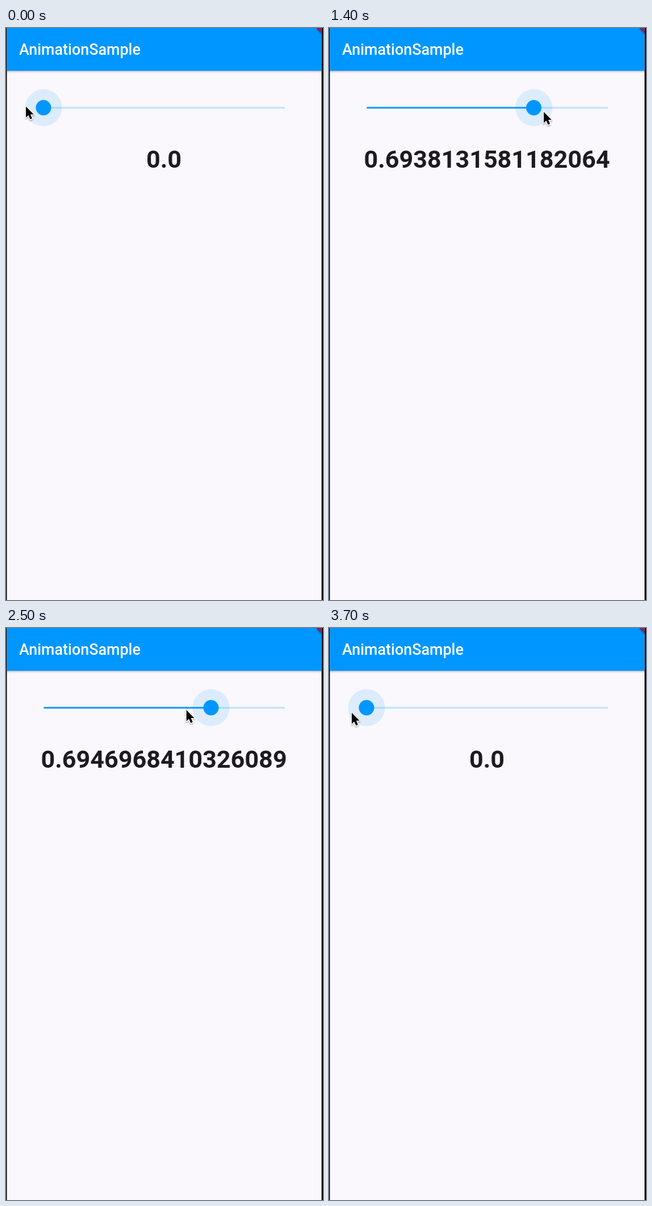
Recreate the animation shown at these times as an HTML page. Size 558 px wide and 1003 px high, loop 3900 ms.

```html
<!DOCTYPE html>
<html lang="en">
<head>
<meta charset="utf-8">
<title>Slider</title>
<style>
  html, body { margin: 0; width: 100%; height: 100%; overflow: hidden; background: #000; }
  svg { display: block; width: 558px; height: 1003px; font-family: Roboto, sans-serif; }
</style>
</head>
<body>
<svg viewBox="0 0 558 1003">
  <defs>
    <linearGradient id="shade" x2="0" y2="1">
      <stop stop-color="#000" stop-opacity=".3"/>
      <stop offset="1" stop-color="#000" stop-opacity="0"/>
    </linearGradient>
    <filter id="soft" x="-50%" y="-50%" width="200%" height="200%">
      <feDropShadow dx="0" dy="1.5" stdDeviation="1.3" flood-opacity=".4"/>
    </filter>
    <clipPath id="screen"><path d="M1.5 0H555.5V1003H1.5Z"/></clipPath>
  </defs>
  <g clip-path="url(#screen)">
    <path d="M0 0H558V1003H0Z" fill="#faf8fc"/>
    <path d="M0 74H558V79H0Z" fill="url(#shade)"/>
    <path d="M0 0H558V75H0Z" fill="#0096ff"/>
    <path d="M546 0H558V12Z" fill="#8c2350" filter="url(#soft)"/>
    <text x="23" y="47" font-size="26.9" font-weight="500" fill="#fff">AnimationSample</text>
  </g>
  <g transform="translate(66 139.8)">
    <g stroke-width="2.7" stroke-linecap="round">
      <path d="M1.5 0H424" stroke="#bce0fd"/>
      <path id="active" stroke="#0096ff"/>
    </g>
    <g id="thumb" fill="#0096ff">
      <circle r="32.5" fill-opacity=".12"/>
      <circle r="13.5"/>
    </g>
  </g>
  <text id="label" x="278" y="244.6" font-size="43.1" font-weight="700" text-anchor="middle" fill="#1d1b20"></text>
  <path id="cursor" d="M0 0V19.6L4.4 15.5L7.5 22.6L11 21.1L8 14.1H13.8Z" stroke="#fff" stroke-width="2.8"
    stroke-linejoin="round" paint-order="stroke" filter="url(#soft)"/>
</svg>
<script>
const $ = id => document.getElementById(id);
const LOOP = 3900, STEP = 100, WIDTH = 424.5, BRAKE = 2800;

// Key poses of the drag: time, slider value, pointer x, pointer y
const poses = [
  [0, 0, 35, 137.5],
  [100, 0, 72, 140],
  [250, 0, 72, 140],
  [700, .27079971976902123, 212.5, 155.5],
  [1400, .6938131581182064, 378, 147],
  [2000, 1, 529, 144],
  [2150, 1, 529, 144],
  [2300, .9863440472146743, 443, 144],
  [BRAKE, .25722603175951103, 129.5, 143.5],
  [3300, .012660814368206753, 57, 146.5],
  [3700, 0, 40, 148.5]
];

// Steady drag between poses, slowing into each one after BRAKE
function poseAt(t) {
  const k = poses.findIndex(pose => pose[0] > t);
  if (k < 0) return poses.at(-1);
  const a = poses[k - 1], b = poses[k];
  const p = (t - a[0]) / (b[0] - a[0]);
  const e = t < BRAKE ? p : 1 - (1 - p) ** 3;
  return a.map((from, i) => from + (b[i] - from) * e);
}

function draw(now) {
  const [, value, x, y] = poseAt(Math.floor(now % LOOP / STEP) * STEP);
  const thumb = WIDTH * value;
  $("label").textContent = Number.isInteger(value) ? value.toFixed(1) : value;
  $("thumb").setAttribute("transform", `translate(${thumb})`);
  $("active").setAttribute("d", `M1.5 0H${Math.max(1.5, thumb)}`);
  $("cursor").setAttribute("transform", `translate(${x} ${y})`);
}

const start = performance.now();
function tick() {
  draw(performance.now() - start);
  requestAnimationFrame(tick);
}
tick();
</script>
</body>
</html>
```
